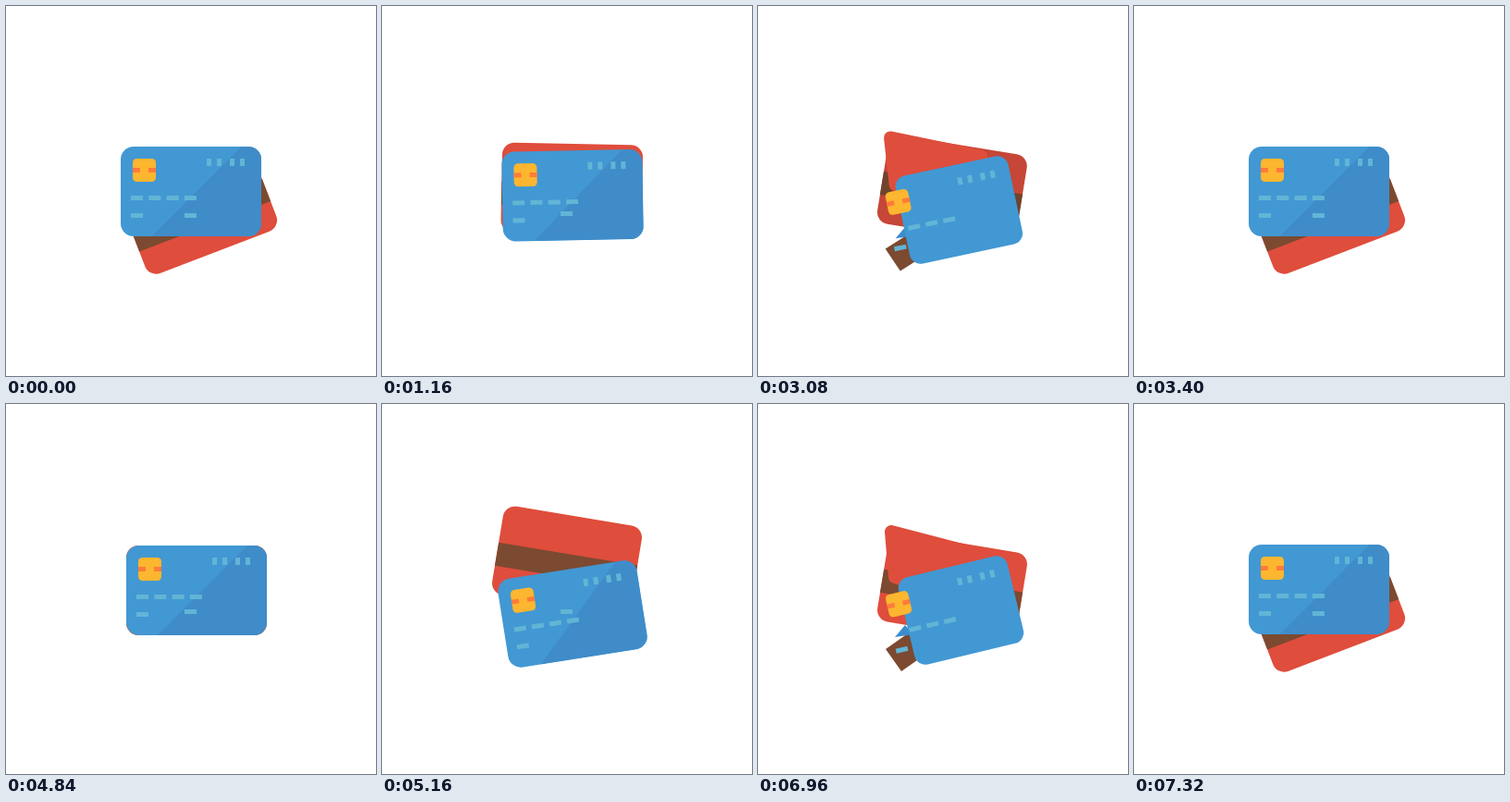
These frames come from a looping animation (400x400 px, 8000 ms). An HTML page:

```html
<!DOCTYPE html>
<html lang="en">
<head>
<meta charset="utf-8">
<title>Two cards</title>
<style>
  html, body { margin: 0; width: 100%; height: 100%; overflow: hidden; background: #fff; }
  svg { display: block; width: 100vw; height: 100vh; }
</style>
</head>
<body>
<svg id="stage" viewBox="0 0 400 400">
  <defs>
    <clipPath id="cardClip"><rect x="-76" y="-48.5" width="152" height="97" rx="14"/></clipPath>
  </defs>
  <g id="red">
    <rect x="-76" y="-48.5" width="152" height="97" rx="13" fill="#df4d3c"/>
    <rect x="-76" y="-7" width="152" height="25.5" fill="#7b4a30"/>
  </g>
  <g id="morph">
    <polygon id="patch" fill="#df4d3c" stroke="#df4d3c" stroke-width="14" stroke-linejoin="round"/>
    <polygon id="strip" fill="#7b4a30"/>
    <polygon id="wedge" fill="#3b8dcf"/>
  </g>
  <g id="blue">
    <rect id="body" y="-48.5" height="97" fill="#4298d3"/>
    <polygon id="shade" points="54.5,-48.5 76,-48.5 76,48.5 -42.5,48.5" fill="#3f8cc9" clip-path="url(#cardClip)"/>
  </g>
  <g id="chip">
    <rect x="-12.5" y="-12.5" width="25" height="25" rx="4.5" fill="#fdb62f"/>
    <path d="M-12.5-2.5h8v5h-8zM4.5-2.5h8v5h-8z" fill="#ff7b39"/>
  </g>
  <g id="dashes" fill="#62b5d5"></g>
</svg>
<script>
const LOOP = 8000, STEP = 40, CYCLE_STARTS = [1120, 4840];
const $ = id => document.getElementById(id);
const mix = (a, b, k) => a.map((v, i) => v + (b[i] - v) * k);
const clamp = v => Math.min(1, Math.max(0, v));

// poses: centre x, centre y, angle
const REST = { blue: [200, 200.5, 0], red: [208.5, 221, -21] };
const STACK = [206, 201.5, 0];
const FAN = { blue: [206, 227, -9], red: [200, 169, 9.4] };
const SETTLED = [206.5, 227, -13.3];
const SQUEEZED = [219.5, 223, -13.5];
const RED_BACK = [210, 198, 9.4];

function onCard([cx, cy, a], x, y) {
  const r = a * Math.PI / 180, c = Math.cos(r), s = Math.sin(r);
  return [cx + x * c - y * s, cy + x * s + y * c, a];
}
// the corners of a box on a card, clockwise from top left
function corners(pose, x, top, bottom) {
  return [[-x, top], [x, top], [x, bottom], [-x, bottom]]
    .flatMap(([px, py]) => onCard(pose, px, py).slice(0, 2));
}

const PATCH = [[144, 138, 240, 163, 240, 220, 148, 187], corners(REST.red, 69, -41.5, 41.5)];
const STRIP = [[138, 265, 199, 222, 216, 246, 155, 289], corners(REST.red, 76, -7, 18.5)];
const WEDGE = [[148, 252, 159, 239, 168, 249], [200, 200, 200, 200, 200, 200]];

// marks on the card
const marks = [];
function addMark(x, y, w, h) {
  const el = document.createElementNS("http://www.w3.org/2000/svg", "rect");
  setAll(el, { x: -w / 2, y: -h / 2, width: w, height: h });
  marks.push({ el: $("dashes").appendChild(el), x, y });
}
for (let i = 0; i < 4; i++) {
  const x = -58.5 + 19.3 * i;
  addMark(x, 7, 13, 5);
  addMark(19.5 + 11 * i + (i > 1 ? 3 : 0), -31.5, 5, 8);
  if (i % 3 === 0) addMark(x, 26, 13, 5);
}
const firstMark = marks[0], looseMark = marks[marks.length - 1];

function setAll(el, attrs) {
  for (const name in attrs) el.setAttribute(name, attrs[name]);
}
function place(el, [x, y, a]) {
  el.setAttribute("transform", `translate(${x} ${y}) rotate(${a})`);
}
function show(el, on) {
  el.setAttribute("visibility", on ? "visible" : "hidden");
}
function drawPolygon(id, [from, to], k) {
  $(id).setAttribute("points", mix(from, to, k).join(" "));
}

function drawCards({ blue, red, print = blue, width = 152, fade = 0, morphing = false }) {
  show($("morph"), morphing);
  show($("shade"), !morphing);
  show(firstMark.el, !morphing);
  show(looseMark.el, !morphing);
  setAll($("body"), { x: -width / 2, width, rx: morphing ? 12 : 14 });
  $("red").style.filter = fade ? `brightness(${1 - fade})` : "none";
  $("red").style.opacity = 1 - fade * fade;
  place($("blue"), blue);
  place($("red"), red);
  place($("chip"), onCard(print, -50.5, -23));
  for (const m of marks) place(m.el, onCard(print, m.x, m.y));
}

function drawFan(ms) {
  const k = clamp(ms / 320);
  const blue = k < 1 ? mix(STACK, FAN.blue, k) : mix(FAN.blue, SETTLED, clamp((ms - 320) / 560));
  drawCards({ blue, red: mix(STACK, FAN.red, k) });
  place(looseMark.el, [199.5, 224.5, 0]);   // this mark stays put
}

function drawReturn(k) {
  drawCards({
    blue: mix(SQUEEZED, REST.blue, k),
    print: mix(SETTLED, REST.blue, k),
    red: mix(RED_BACK, REST.blue, k * k),
    width: 121 + 31 * k,
    fade: k,
    morphing: true
  });
  drawPolygon("patch", PATCH, k ** 1.25);
  drawPolygon("strip", STRIP, k);
  drawPolygon("wedge", WEDGE, k * k);
}

function draw(ms) {
  const t = Math.floor((ms % LOOP) / STEP) * STEP;
  const cycle = t < CYCLE_STARTS[1] ? 0 : 1;
  const begin = CYCLE_STARTS[cycle];
  const end = [3400, 7320][cycle];
  const back = [3080, 6960][cycle];
  if (t < begin || t >= end) drawCards(REST);
  else if (t < back) drawFan(t - begin);
  else drawReturn(1 - (end - t) / 360);
}

const start = performance.now();
function tick() {
  draw(performance.now() - start);
  requestAnimationFrame(tick);
}
tick();
</script>
</body>
</html>
```
